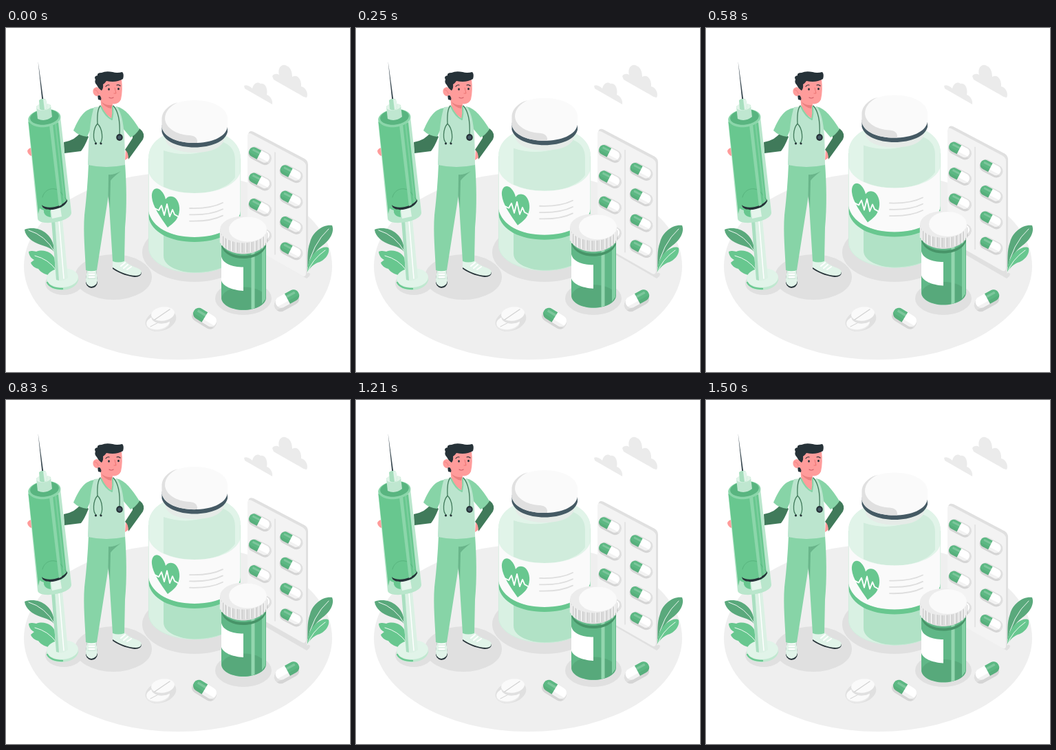
These frames come from a looping animation (500 by 500 pixels, 1.54 s). An HTML page with a canvas:

```html
<!DOCTYPE html>
<html lang="en">
<head>
<meta charset="utf-8">
<title>Pharmacy</title>
<style>
html, body { margin: 0; width: 100%; height: 100%; overflow: hidden; background: #fff; }
canvas { display: block; width: 500px; height: 500px; }
</style>
</head>
<body>
<canvas id="stage"></canvas>
<script>
const canvas = document.getElementById('stage');
const ratio = window.devicePixelRatio || 1;
canvas.width = canvas.height = 500 * ratio;
const ctx = canvas.getContext('2d');

const GREEN = '#68c78f', PANTS = '#87d4a7', DEEP = '#407a5a', DARK = '#263238';
const MINT = '#bbe5ce', PALE = '#e1f4e9', SKIN = '#ff9c9b', LEAF = '#5aa97c';
const PAPER = '#fafafa', SHADE = '#e0e0e0';

const LOOP = 1540, STEPS = 37, RISE = 10;

function fill(d, color) {
  ctx.fillStyle = color;
  ctx.fill(new Path2D(d));
}

function line(d, color, width = 1) {
  ctx.strokeStyle = color;
  ctx.lineWidth = width;
  ctx.lineCap = ctx.lineJoin = 'round';
  ctx.stroke(new Path2D(d));
}

function oval(x, y, rx, ry, color, turn = 0) {
  ctx.fillStyle = color;
  ctx.beginPath();
  ctx.ellipse(x, y, rx, ry, turn, 0, 7);
  ctx.fill();
}

function placed(x, y, turn, draw) {
  ctx.save();
  ctx.translate(x, y);
  ctx.rotate(turn);
  draw();
  ctx.restore();
}

// Two-tone capsule; the left half takes the first colour.
function capsule(x, y, turn, length, width, left, right) {
  placed(x, y, turn, () => {
    const h = length / 2, r = width / 2;
    ctx.beginPath();
    ctx.roundRect(-h, -r, length, width, r);
    ctx.clip();
    ctx.fillStyle = left;
    ctx.fillRect(-h, -r, h, width);
    ctx.fillStyle = right;
    ctx.fillRect(0, -r, h, width);
    ctx.fillStyle = 'rgba(0,0,0,.05)';
    ctx.fillRect(-h, r * .4, length, r);
    ctx.fillStyle = 'rgba(255,255,255,.2)';
    ctx.fillRect(-h * .75, -r * .55, length * .75, r * .4);
  });
}

function ground() {
  oval(250, 346, 224, 136, '#efefef');
  fill('M346 84C350 82 355 85 358 88C360 79 367 78 370 81C377 79 381 89 379 97C385 99 388 106 387 111L347 88Z', '#ebebeb');
  fill('M387 70C389 66 394 66 397 68C394 57 402 51 408 55C414 57 416 65 416 71C424 66 430 76 429 85C436 86 440 96 437 101C433 101 428 97 424 95L389 75Z', '#ebebeb');
  oval(274, 326, 76, 43, SHADE);
  oval(345, 393, 41, 24, SHADE);
  oval(156, 362, 56, 33, SHADE);
  oval(84, 371, 27, 17, SHADE);
  fill('M352 306L442 357Q442 361 437 364L352 315Z', SHADE);
}

function leftPlant() {
  fill('M72 328C66 319 58 318 50 315C38 311 28 303 27 293C37 289 50 291 59 299C68 307 70 317 72 328Z', LEAF);
  line('M33 294Q57 301 71 326', '#fff', .9);
  fill('M74 358C66 362 52 358 47 350C42 349 37 345 36 341L41 337C36 335 33 329 33 325C39 323 42 325 44 325C54 321 68 325 72 338Z', GREEN);
  line('M42 331Q62 336 73 352', '#fff', .9);
}

function rightPlant() {
  fill('M438 350C439 337 437 324 442 311C446 296 461 285 474 287C478 297 470 309 460 316C449 324 443 335 438 350Z', LEAF);
  line('M469 292Q445 314 438 352', '#fff', .9);
  fill('M438 356C438 341 443 331 452 324C458 319 466 317 469 320C471 329 462 339 453 341C446 344 441 349 438 356Z', GREEN);
  line('M464 323Q444 337 438 356', '#fff', .9);
}

function blister() {
  fill('M352 155Q353 148 360 151L434 190Q439 193 439 199L439 356Q439 364 432 361L352 315Z', SHADE);
  fill('M351 158Q351 151 357 154L431 193Q436 196 436 201L436 356Q436 363 430 360L351 315Z', '#f3f3f3');
  line('M391 181V329', '#dcdcdc', 1.3);
  for (const [x, top] of [[368, 184.5], [413.5, 210.5]]) {
    for (let row = 0; row < 4; row++) {
      const y = top + row * 37.4;
      capsule(x + 1, y + 1.2, .48, 36, 19, SHADE, SHADE);
      capsule(x, y, .48, 32, 14.5, '#5cb883', '#fff');
    }
  }
}

function jar() {
  fill('M228 157Q207 169 207 190V319C207 340 237 356 274 356S341 340 341 319V190Q341 169 320 157Z', '#d9f1e3');
  fill('M228 157Q207 169 207 190V208C211 227 239 240 274 240S337 227 341 208V190Q341 169 320 157Z', PALE);
  fill('M229 178Q274 193 316 166Q333 173 333 192V217C323 232 300 240 274 240C256 240 241 236 229 231Z', '#d0ecdc');
  fill('M229 294Q274 318 341 288V319C341 340 311 356 274 356C253 355 229 347 229 331Z', '#b1e2c6');
  fill('M207 208C211 227 239 240 274 240S337 227 341 208V267C337 290 309 304 274 304S212 290 207 267Z', PAPER);
  fill('M207 266C212 290 239 304 274 304S337 290 341 266V274C337 297 309 311 274 311S211 297 207 274Z', GREEN);
  line('M207.4 190V319C207.4 340 237 355.6 274 355.6S340.6 340 340.6 319V190', '#cfebdb', .7);

  fill('M235 290C225 276 213 259 212 246C211 234 219 230 225 236C229 240 231 244 232 249C235 244 242 243 247 248C253 255 254 267 249 276C246 282 240 286 235 290Z', GREEN);
  line('M214 261L222 265L226 258L230 272L234 256L238 274L242 264L245 271L252 275', '#fff', 1.9);
  for (let i = 0; i < 3; i++) {
    const y = 262 + i * 9.3;
    line(`M267 ${y}Q297 ${y + 1} 315 ${y - 8}`, '#dedede', 1.8);
  }

  fill('M232 156V164C237 176 254 181 274 181S312 176 317 163V156Z', '#e5ebe7');
  fill('M226.5 141V151C230 165 250 173.5 274 173.5S319 165 322 151V141Z', '#455a64');
  fill('M226.5 132C227 116 248 105 274 105S322 116 322 132V144C319 159 298 167 274 167S229 159 226.5 144Z', PAPER);
  fill('M226.5 132C227 120 238 111 250 108C239 113 231 121 231 132C232 145 247 155 267 156Q279 157 278 167C249 168 229 158 226.5 144Z', SHADE);
}

function vial() {
  fill('M313 308V392C313 402 327 410 345 410S378 402 378 392V308Z', '#60b787');
  oval(345.5, 393, 32, 16.5, '#57a97b');
  fill('M356.5 320H361.5V407L356.5 409Z', '#93d6af');
  fill('M372 316H377V394L372 401Z', '#82cfa3');
  fill('M313 332C315 342 328 347.5 345 347.5V382C328 381 315 375 313 367Z', '#fff');
  fill('M313 313C317 325 330 331 345 331S374 325 378 313V317C374 329 360 335 345 335S317 329 313 317Z', '#479468');

  fill('M311 292V309C313 320 328 328.5 345 328.5S377 320 379 309V292Z', '#dcdcdc');
  for (let i = 1; i < 15; i++) {
    const a = Math.PI * i / 15, x = 345 - 34 * Math.cos(a), y = 294 + 18 * Math.sin(a);
    line(`M${x} ${y}v14`, '#f3f3f3', 1.8);
    line(`M${x + 1.5} ${y}v14`, '#bcbcbc', .7);
  }
  oval(345, 293, 34, 19.5, '#ececec');
  oval(351.5, 292.5, 27.5, 18, PAPER);
}

function looseMedicine() {
  oval(225, 425, 23, 15, SHADE, -.3);
  oval(221, 430, 17, 10, '#e9e9e9', -.15);
  oval(221, 428, 17, 10, PAPER, -.15);
  line('M210 434L233 422', '#d2d2d2', 1);
  oval(228, 418, 17, 11.5, SHADE, -.15);
  oval(228, 415.5, 17, 10, PAPER, -.15);
  line('M216 424L238 409', '#d2d2d2', 1.3);
  capsule(288, 423, .55, 39, 19, SHADE, SHADE);
  capsule(289, 420.5, .55, 37, 17, '#5cb883', '#fff');
  capsule(408, 398, -.5, 39, 19, SHADE, SHADE);
  capsule(409, 393.5, -.5, 37, 17, '#fff', '#5cb883');
}

function doctor() {
  // shoes
  fill('M118 351H131L133 370Q132 377 124 378Q115 376 116 367Z', DARK);
  fill('M118 350H131L133 367Q132 375 124 376Q115 374 116 365Z', PALE);
  fill('M120 352H129V364H120Z', '#fff');
  line('M120 356H129M120 360H129M119 364H130', '#b5d9c4', .8);
  fill('M155 340V350C166 358 179 361 187 362Q197 362 197 355Z', DARK);
  fill('M155 338L171 336C178 346 190 347 196 352Q199 359 189 360C177 360 164 354 155 348Z', PALE);
  line('M167 346L173 341M171 349L177 344M176 351L182 347', '#fff', 2);

  // trousers
  fill('M120 197L173 197C175 225 176 260 173 290L172 339Q163 342 155 339L149 243L132 352Q124 355 116 352C115 326 112 297 114 272C117 246 119 222 120 197Z', PANTS);
  fill('M149 213Q157 214 167 208Q154 218 152 222L151 262L148.5 245Z', '#69b58a');

  // arms
  fill('M84 166Q101 163 109 151L120 158Q114 173 109 179L85 182Z', DEEP);
  fill('M174 175C181 170 184 180 179 188L173 192Z', SKIN);
  fill('M184 153L194 146Q203 153 199 162L178 191Q178 180 173 177L184 160Z', DEEP);
  fill('M130 116C115 117 107 128 98 149Q106 157 118 158L127 138Z', PANTS);
  fill('M160 114C174 117 183 130 194 147Q188 156 181 159L170 146Z', PANTS);

  // neck and tunic
  fill('M137 99H155V118L154 132L139 121Z', SKIN);
  fill('M138 106Q143 113 154 112L153 117Q142 115 138 106Z', '#e9807f');
  fill('M128 115L138 114Q144 128 154 133Q156 124 155 114L162 115C171 130 173 151 173 199Q146 205 119 199C120 170 121 136 128 115Z', MINT);
  line('M138 114Q144 128 154 133Q156 124 155 114', PANTS, 2);

  // stethoscope
  line('M137 113Q132 119 133 139M133 139C126 147 126 163 131 167M133 139C141 147 141 163 137 167', DEEP, 1.3);
  line('M156 113C164 122 166 137 165 155', DEEP, 1.3);
  oval(130.5, 168, 1.6, 1.4, DARK);
  oval(138, 168, 1.6, 1.4, DARK);
  oval(165, 159, 4.8, 5, DARK);
  oval(165, 159, 2.6, 2.8, '#455a64');

  // head
  fill('M133 97L139 99L138 105L134 104Z', DARK);
  fill('M136 78L168 75Q170 91 167 104Q163 112 153 110Q140 108 136 97Z', SKIN);
  fill('M139 91Q142 87 141 82Q144 80 146 77Q160 80 170 74Q172 67 169 64Q161 66 155 64Q145 62 139 65Q132 65 133 69Q127 70 130 75Q128 79 132 83L135 88Z', DARK);
  oval(131.8, 92.5, 5.4, 6.5, SKIN, -.2);
  line('M129 90Q133 90 134 95', '#e9807f', .9);
  oval(149.5, 89, 1.4, 1.7, DARK);
  oval(163.5, 88.5, 1.4, 1.7, DARK);
  line('M145 85Q147 82 150 83M161 83Q164 82 166 84', DARK, 1.2);
  line('M158 87L160 95L157 95', '#e9706f', .9);
  line('M150 101Q153 103 156 101', '#cf5d68', 1.2);
}

function syringe() {
  fill('M40 173Q31 175 31 179Q32 186 42 187Z', SKIN);
  // plunger
  fill('M59 363Q81 345 105 362V367C102 377 91 381 79 381S59 375 59 367Z', '#c0e8d0');
  oval(82, 363, 23, 14, PALE, -.05);
  line('M60 370Q65 379 82 379', GREEN, 2.4);
  fill('M66 279L82 277L90 363Q82 370 73 366Z', '#dbf1e4');
  fill('M66 279L71 279L77 367L73 366Z', '#aadfc1');
  line('M77 280L84 364', '#fff', 1.5);

  // barrel
  fill('M32 134C32 118 79 112 79 129L95 268C96 282 47 289 46 277Z', '#b9e6cc');
  fill('M32.5 136Q55 150 76 137L88 253C82 266 56 269 49 262L47 270Z', GREEN);
  fill('M65 264L79 261L81 274L67 277Z', '#e6f5ec');
  fill('M55 262H64L65 275Q57 274 55 268Z', GREEN);
  line('M53 246C56 232 74 229 82 242L89 251', '#58b47e', 1);
  fill('M52 257C58 264 82 261 89 249V252C83 264 59 268 53 260Z', DARK);
  fill('M63 141L68 140L81 257L77 259Z', '#8bd6aa');
  fill('M71 139L73 138L86 252L84 254Z', '#7dcf9f');
  oval(56, 131, 23.5, 13, '#8bd6aa', -.11);
  oval(56, 129.5, 21, 11, '#59b580', -.11);

  // nozzle and needle
  fill('M44 114Q54 106 65 112L67 129Q57 137 46 132Z', '#bfe7d0');
  oval(54.5, 114.5, 10.5, 5, PALE, -.1);
  fill('M48 105Q53 101 58 104L60 117Q55 121 49 118Z', '#a8dfbf');
  fill('M54 103L58 104L60 117L56 119Z', PALE);
  fill('M46.5 48L54.2 103H52.2Z', '#37474f');
}

function render(now) {
  const step = Math.floor((now % LOOP + 3) * STEPS / LOOP);
  const phase = (step / STEPS + 50 / LOOP) % 1;
  const lift = RISE * (1 - Math.abs(2 * phase - 1));

  ctx.setTransform(ratio, 0, 0, ratio, 0, 0);
  ctx.fillStyle = '#fff';
  ctx.fillRect(0, 0, 500, 500);
  ground();
  leftPlant();
  placed(0, .65 - lift, 0, () => {
    blister();
    jar();
    vial();
  });
  rightPlant();
  looseMedicine();
  doctor();
  syringe();
}

const start = performance.now();
function tick() {
  render(performance.now() - start);
  requestAnimationFrame(tick);
}
tick();
</script>
</body>
</html>
```
